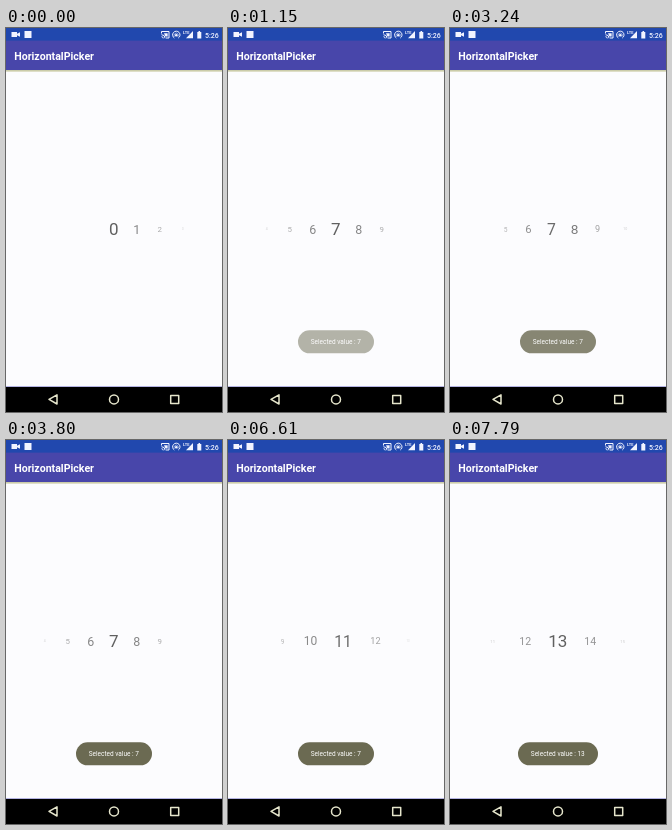
An HTML page for the animation above (8 s loop, 216x384 px).

```html
<!DOCTYPE html>
<html lang="en">
<head>
<meta charset="utf-8">
<title>HorizontalPicker</title>
<style>
html, body { margin: 0; width: 100%; height: 100%; overflow: hidden; background: #fcfcfe; }
svg { display: block; width: 100%; height: 100%; }
text { font-family: Roboto, sans-serif; }
.mid { text-anchor: middle; }
.line { fill: none; stroke: #e6e6cc; stroke-width: 1.5; stroke-linejoin: round; }
.icon { fill: none; stroke: #f2f4ff; stroke-width: 1; }
</style>
</head>
<body>
<svg viewBox="0 0 216 384">
  <rect width="216" height="384" fill="#fcfcfe"/>
  <rect width="216" height="42" fill="#4846aa"/>
  <rect width="216" height="12.6" fill="#2148ae"/>
  <rect y="42" width="216" height="1" fill="#cbcca9"/>
  <rect y="43" width="216" height="1" fill="#dedec8"/>
  <text x="8.2" y="31.6" font-size="10.6" font-weight="700" fill="#fff">HorizontalPicker</text>

  <g fill="#f2f4ff">
    <path d="M5.500 4H11v1.800l3-1.600v4.600l-3-1.600V9H5.500z"/>
    <rect x="18.500" y="3" width="7" height="7"/>
    <path d="M180 10.300L187 3V10.300z"/>
    <path d="M191.300 4h1.200v-1h1.600v1h1.200v6.500h-4z"/>
    <circle cx="170.300" cy="7.200" r="1.300"/>
    <path d="M158 5.200h3.600v3.400h-2.200z"/>
    <text x="177" y="5.800" font-size="4" font-weight="700">LTE</text>
    <text x="199" y="9.500" font-size="7" font-weight="500">5:26</text>
  </g>
  <g class="icon">
    <path d="M155.500 5.500V3.500H163V10H160M155.500 6.700a3.600 3.600 0 0 1 3.600 3.600M155.500 8.700a1.700 1.700 0 0 1 1.700 1.700"/>
    <path d="M168.300 10a3.700 3.700 0 1 1 4 0"/>
    <path d="M168.900 8.800a2.100 2.100 0 1 1 2.800 0" stroke-width=".5"/>
  </g>

  <g id="picker" class="mid" fill="#606060"></g>
  <g id="toasts" class="mid"></g>

  <rect y="358" width="216" height="1" fill="#b4b3e2"/>
  <rect y="359" width="216" height="25" fill="#000"/>
  <g class="line">
    <path d="M51 366.800V376L43 371.400z"/>
    <circle cx="108" cy="371.400" r="4.500"/>
    <rect x="164.700" y="367.400" width="8" height="8"/>
  </g>
</svg>
<script>
const LOOP = 8000, CENTER = 107.7;
const NS = 'http://www.w3.org/2000/svg';

function add(parent, tag, attrs, text = '') {
  const el = document.createElementNS(NS, tag);
  for (const k in attrs) el.setAttribute(k, attrs[k]);
  el.textContent = text;
  return parent.appendChild(el);
}

const span = (t, a, b) => Math.min(1, Math.max(0, (t - a) / (b - a)));
const fling = p => 1 - (1 - p) ** 1.8;
const smooth = p => p * p * (3 - 2 * p);

// Two-digit cells are wider than one-digit cells
const cell = n => n < 10 ? 23 : 32.5;
const places = [0];
for (let n = 1; n < 20; n++) places[n] = places[n - 1] + (cell(n - 1) + cell(n)) / 2;

const picker = document.getElementById('picker');
const items = places.map((_, n) => add(picker, 'text', { y: 6, 'font-size': 17 }, n));

function scrollAt(t) {
  const first = places[7] * fling(span(t, 460, 1010));
  const nudge = 10 * (smooth(span(t, 2590, 2880)) - smooth(span(t, 3090, 3450)));
  const second = (places[13] - places[7]) * fling(span(t, 6390, 6970));
  return first + nudge + second;
}

const toasts = [
  [7, 1000, 3010], [7, 3280, 5265], [7, 5265, 7250], [13, 7250, 9000]
].map(([value, start, end]) => {
  const el = add(document.getElementById('toasts'), 'g', {});
  const w = value < 10 ? 76 : 80;
  add(el, 'rect', { x: 108 - w / 2, y: 302.3, width: w, height: 23, rx: 11.5, fill: '#6b6a52' });
  add(el, 'text', { x: 107.8, y: 315.8, 'font-size': 6.5, fill: '#fff' }, `Selected value : ${value}`);
  return { el, start, end };
});

function draw(t) {
  const scroll = scrollAt(t);
  items.forEach((el, n) => {
    const dx = places[n] - scroll, d = Math.abs(dx);
    const shown = d < 73;
    el.setAttribute('visibility', shown ? 'visible' : 'hidden');
    if (!shown) return;
    el.setAttribute('transform', `translate(${CENTER + dx} 201.2) scale(${1 - d / 86})`);
    el.setAttribute('opacity', 1 - d / 95);
  });
  for (const { el, start, end } of toasts) {
    const fadeIn = 1 - (1 - span(t, start, start + 520)) ** 2;
    const fadeOut = 1 - span(t, end, end + 520) ** 2;
    el.setAttribute('opacity', fadeIn * fadeOut);
  }
}

const begin = performance.now();
function tick() {
  draw((performance.now() - begin) % LOOP);
  requestAnimationFrame(tick);
}
tick();
</script>
</body>
</html>
```
